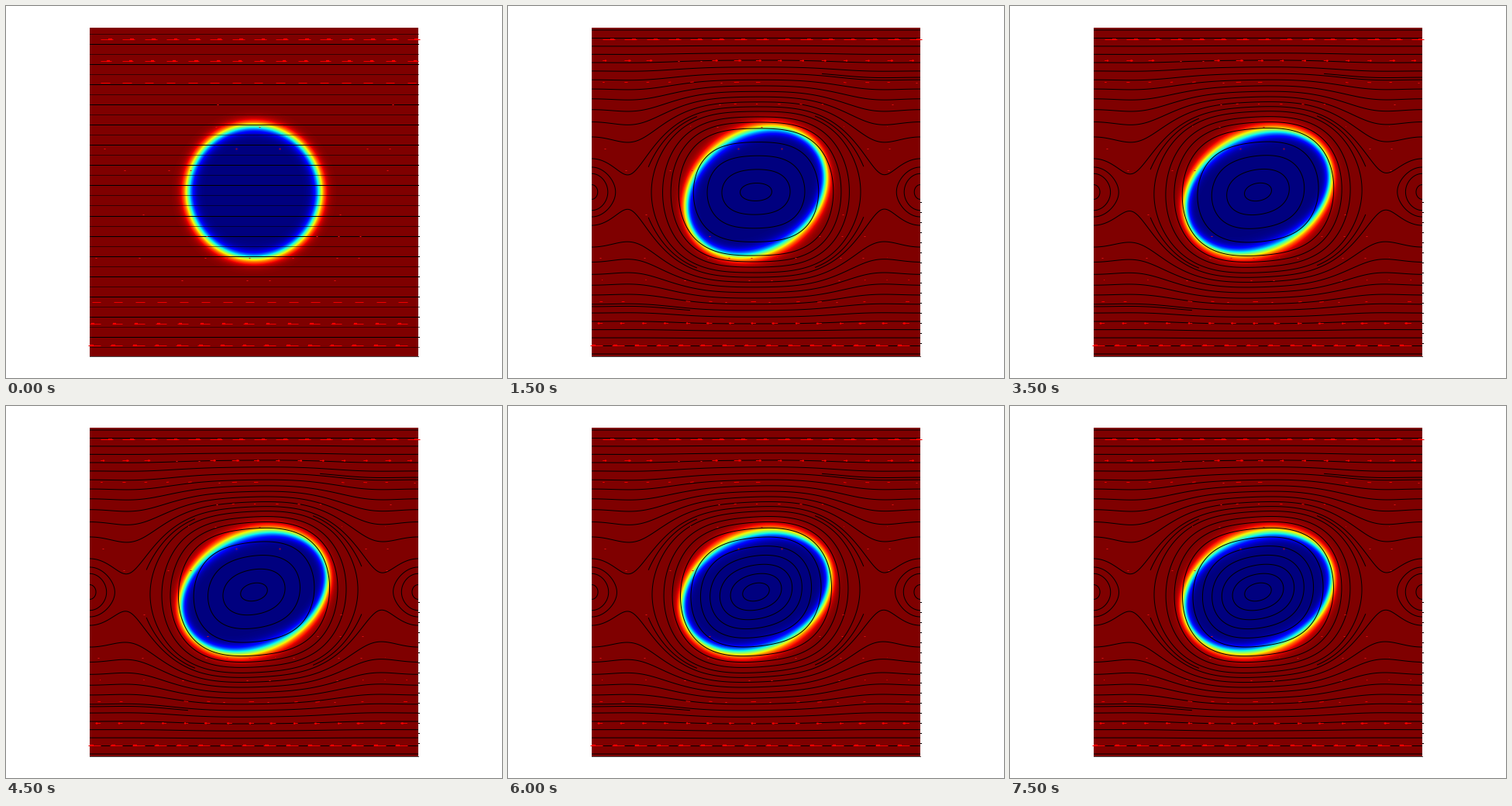
Write a matplotlib script that moves like this. It is 640 px wide and 480 px high and loops after 8 s.

```python
import numpy as np
import matplotlib.pyplot as plt
from matplotlib.animation import FuncAnimation
from matplotlib.collections import LineCollection

FRAMES, STEP = 16, 500
L, R, T, B = 108, 532, 28, 452
CX, CY, H = 320, 240, 212
R0 = 85.3                       # drop radius at rest
K = np.pi / H
PX = 0.72                       # one pixel in points
CELL = 2 * H / 15               # spacing of the arrow grid
SCALE = 0.081                   # arrow length per unit of speed

fig = plt.figure(figsize=(6.4, 4.8), dpi=100, facecolor="white")
ax = fig.add_axes([0, 0, 1, 1])
ax.axis("off")

pix = np.arange(-H + 0.5, H)
X, Y = np.meshgrid(pix, -pix)
grid = np.linspace(-H, H, 285)
GX, GY = np.meshgrid(grid, grid)


def ease(t, start, tau):
    """Exponential approach from 0 to 1."""
    return 1 - np.exp(-max(t - start, 0) / tau)


def drop(t):
    """Phase field of the drop: 0 inside, 1 outside."""
    d = 0.15 * ease(t, 0, 0.9)
    tilt = np.radians(45 - 23 * ease(t, 0, 2.6))
    a = R0 * np.sqrt((1 + d) / (1 - d))
    b = R0 ** 2 / a
    u = X * np.cos(tilt) + Y * np.sin(tilt)
    v = Y * np.cos(tilt) - X * np.sin(tilt)
    rho = np.hypot(u / a, v / b)
    dist = rho * (rho - 1) / np.hypot(u / a ** 2, v / b ** 2)
    width = 7.6 * (1 - 1.3 * d * np.cos(2 * (np.arctan2(Y, X) - tilt / 2)))
    return 0.5 + 0.5 * np.tanh(dist / width)


def stream(x, y, t):
    """Stream function of the shear flow around a row of drops."""
    if t == 0:
        return y ** 2 / 2 + 0 * x
    a3 = -434 + 60 * ease(t, 1.5, 1)
    a1, a2 = 2846 - a3, 997 + 1.21 * a3
    bump = sum(a * (1 - np.cos(n * K * x))
               for n, a in enumerate((a1, a2, a3), 1))
    skew = 0.16 * ease(t, 1.3, 1.5)
    lean = skew * np.sin(K * x) / K * y * np.exp(-(x ** 2 + y ** 2) / 95 ** 2)
    return y ** 2 / 2 + bump * (1 - (y / H) ** 2) ** 2.5 - lean


def velocity(x, y, t, e=0.5):
    u = stream(x, y + e, t) - stream(x, y - e, t)
    v = stream(x - e, y, t) - stream(x + e, y, t)
    return u / (2 * e), v / (2 * e)


def segments(segs, color, width, z, **kw):
    ax.add_collection(LineCollection(
        segs, colors=color, linewidths=width * PX, zorder=z,
        capstyle="butt", **kw), autolim=False)


def arrows(t, rng):
    """Red arrows with tails on the grid; they fade out towards the middle."""
    shafts, heads, dots = [], [], []
    for row in range(-7, 8):
        far = abs(row)
        if far == 0:
            continue
        py = np.floor(CY - row * CELL) + 0.5
        for col in range(-7, 8):
            x = col * CELL
            luck, size = rng.random(2)
            u, v = velocity(x, row * CELL, t) if far < 7 else (row * CELL, 0)
            u, v = SCALE * u, SCALE * v
            px = CX + x
            if far == 7 or t == 0:
                shown, f = far >= 5, 1
            else:
                shown = luck < (far - 2.5) / 4
                f = (far - 2) / 5 * (0.45 + 0.5 * size)
            if shown:
                tip = np.array([px + f * u, py - f * v])
                back = f * np.array([-u, v])
                shafts.append([(px, py), tip])
                if far >= 6:
                    heads.append([tip + 0.4 * back, tip + 0.1 * back])
            elif luck > 0.75:
                tx = np.floor(px + u)
                dots.append([(tx, py), (tx + 1.6, py)])
    segments(shafts, "#ee0000", 1, 4)
    segments(heads, "#ff0000", 2.2, 4)
    segments(dots, "#e01010", 1, 4)


def contours(psi, heights, mask=True):
    """Streamlines that cross the middle axis at the given heights."""
    field = np.ma.masked_where(~(mask & np.isfinite(psi)), psi)
    ax.contour(CX + GX, CY - GY, field, levels=np.square(heights) / 2,
               colors="black", linewidths=PX, zorder=3)


def row_line(y, x0, x1, alpha=1.0):
    segments([[(x0, y + 0.5), (x1, y + 0.5)]], (0, 0, 0, alpha), 1, 3,
             antialiased=False)


def streamlines(t):
    if t == 0:
        for i in range(32):
            y = int(35.3 + 13.04 * i)
            strong = int(abs(i - 16.5)) % 2
            row_line(y, L, R + (y > CY), 1 if strong else 0.55)
    else:
        psi = stream(GX, GY, t)
        s = np.linspace(0, 1, 13)
        contours(psi, np.linspace(11.5, 82, 7 if t > 5 else 5))
        contours(psi, np.linspace(90, 104, 3))
        contours(psi, 110 + 72 * s + 27 * s ** 2)
        contours(psi, np.linspace(106.85, 108.5, 3), abs(GX) > 163)
        contours(psi, [107.3], (abs(GX) > 75) & (abs(GX) < 140))
        contours(psi, [155], (GX * GY > 0) & (abs(GX) > 85))
        for y in range(252, 445, 13):
            row_line(y, R, R + 1)
    row_line(B - 1, L, R, 0.7)


def draw(n):
    for art in list(ax.collections) + list(ax.images):
        art.remove()
    t = n * STEP / 1000
    ax.imshow(drop(t), cmap="jet", vmin=0, vmax=1, extent=(L, R, B, T),
              interpolation="nearest", aspect="auto", zorder=1)
    streamlines(t)
    arrows(t, np.random.default_rng(40))
    ax.set_xlim(0, 640)
    ax.set_ylim(480, 0)
    return []


anim = FuncAnimation(fig, draw, frames=FRAMES, init_func=lambda: [],
                     interval=STEP, repeat=True, repeat_delay=0)
plt.show()
```
